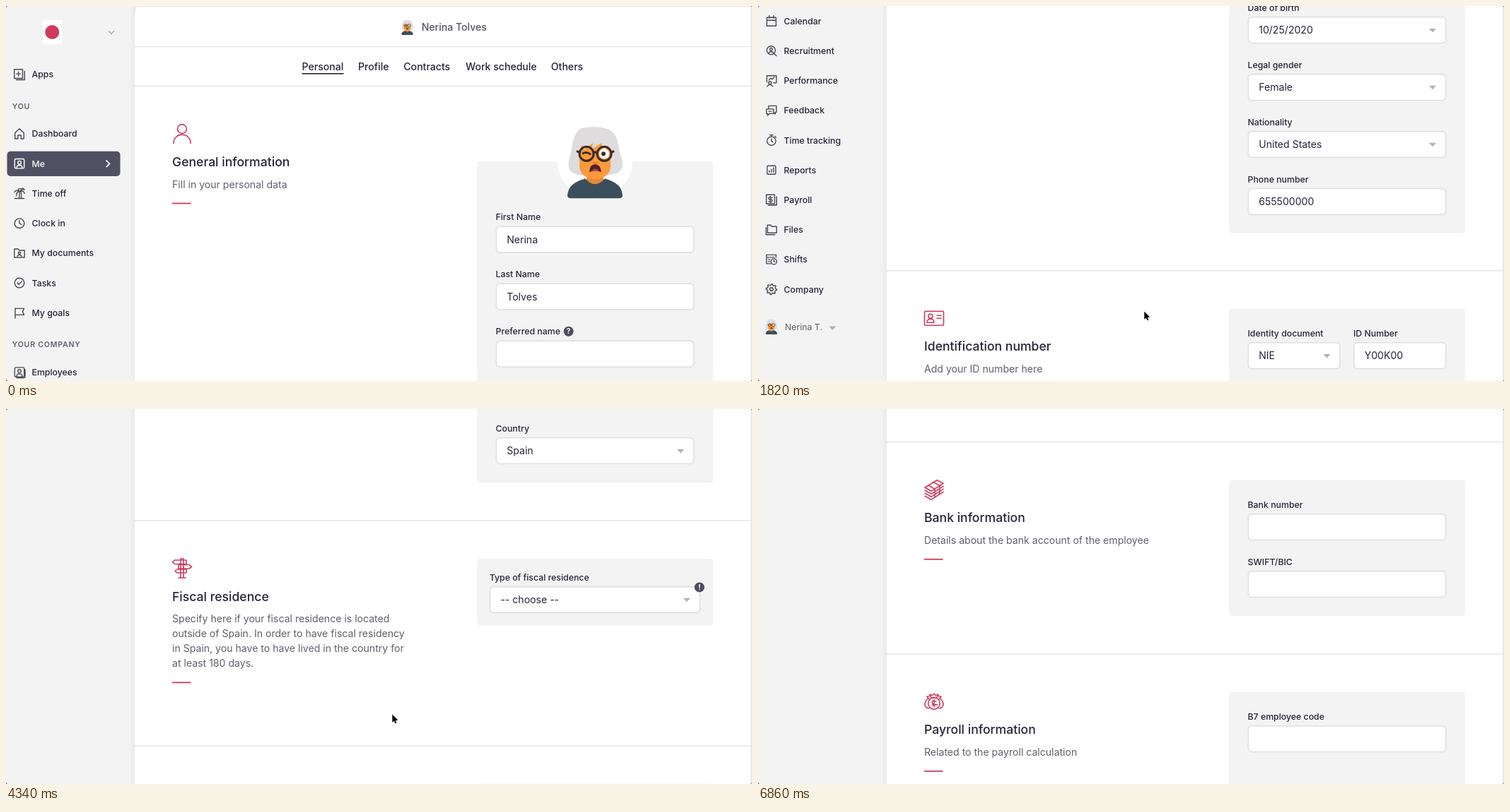
These frames come from a looping animation (1055x531 px, 7.28 s). An HTML page:

```html
<!DOCTYPE html>
<html lang="en">
<head>
<meta charset="utf-8">
<title>Employee profile</title>
<style>
  html, body { margin: 0; width: 100%; height: 100%; overflow: hidden; background: #555; }
  #stage { display: block; width: 1055px; height: 531px; border-radius: 3px; background: #f3f3f3; }
  text { font-family: Inter, sans-serif; fill: #25253a; }
  .icon { fill: none; stroke: #484852; stroke-width: 1.4; stroke-linejoin: round; stroke-linecap: round; }
  .red { stroke: #cf3a5b; stroke-width: 1.6; }
  .input { fill: #fff; stroke: #dfdfe1; stroke-width: 1.6; }
</style>
</head>
<body>
<svg id="stage" viewBox="0 0 1055 531">
  <defs>
    <linearGradient id="edge"><stop stop-color="#f1f1f1"/><stop offset="1" stop-color="#e9e9e9"/></linearGradient>
    <g id="avatar">
      <path fill="#dedcdc" d="M-20-49C-8-52 10-52 20-47C30-42 32-32 34-20C36-8 41-4 38 7C35 17 18 18 0 18S-34 18-37 7C-39-3-35-8-33-20C-31-34-28-44-20-49Z"/>
      <path fill="#e88a34" d="M-12 10H12V29L0 35L-12 29Z"/>
      <path fill="#fb9a3c" d="M-22-22Q0-38 22-22V4C22 17 10 23 0 23S-22 17-22 4Z"/>
      <path fill="#dedcdc" d="M-24-10V-30Q0-42 24-30V-10L19-24 12-18 9-28-4-20-3-28-16-19-18-27Z"/>
      <path fill="#3a4f5b" d="M-39 47C-38 31-28 27-14 22Q0 38 14 22C28 27 38 31 39 47Q38 50 34 50H-34Q-38 50-39 47Z"/>
      <circle cx="13" cy="-13" r="7" fill="#fff"/>
      <circle cx="12" cy="-13" r="3" fill="#3a2a25"/>
      <g fill="none" stroke="#382b28" stroke-width="3">
        <circle cx="-12" cy="-13" r="10"/><circle cx="13" cy="-13" r="10"/>
        <path d="M-2-14Q0-17 3-14M-22-15l-4-2M23-15l4-2M-18-13q6-4 12 1"/>
      </g>
      <path fill="none" stroke="#d5742a" stroke-width="2" d="M-3-1Q1 2 4-1"/>
      <path fill="#54202a" d="M-8 13Q-8 2 0 2T9 13Q0 9-8 13Z"/>
      <path fill="#e4606c" d="M-5 11Q0 6 6 11Q0 9-5 11Z"/>
    </g>
  </defs>
  <rect x="176" width="6.5" height="531" fill="url(#edge)"/>
  <rect x="1053" width="2" height="531" fill="#e8e8e8"/>
  <g id="page"></g>
  <path id="cursor" d="M546.3 432.6V443.8L548.8 441.5 550.5 445.3 552.4 444.5 550.8 440.8H554.4Z"
    stroke="#fff" stroke-width="1.4" paint-order="stroke"/>
</svg>
<script>
const INK = '#25253a', GREY = '#60606c', RED = '#cf3a5b', DARK = '#4c4c5e';

const text = (x, mid, label, size = 12.32, weight = 500, fill = INK, extra = '') =>
  `<text x="${x}" y="${mid + size * 0.36}" font-size="${size}" font-weight="${weight}" style="fill:${fill}" ${extra}>${label}</text>`;
const rect = (x, y, w, h, r, attrs) =>
  `<rect x="${x}" y="${y}" width="${w}" height="${h}" rx="${r}" ${attrs}/>`;
const path = (x, y, d, cls = 'icon', attrs = '') =>
  `<path transform="translate(${x} ${y})" class="${cls}" d="${d}" ${attrs}/>`;
const rule = (y) => rect(182, y - 0.75, 871, 1.5, 0, 'fill="#e6e6e7"');
const caret = (x, y) => path(x, y, 'M-5-2.5H5L0 3Z', '', 'fill="#b1b1b4"');
const face = (x, y, scale) => `<use href="#avatar" transform="translate(${x} ${y}) scale(${scale})"/>`;
const ring = (x, y, r) => `M${x - r} ${y}a${r} ${r} 0 1 0 ${2 * r} 0a${r} ${r} 0 1 0 ${-2 * r} 0`;
const badge = (x, y, mark) => `<circle cx="${x}" cy="${y}" r="7" fill="${DARK}"/>` +
  text(x, y, mark, 10, 700, '#fff', 'text-anchor="middle"');

// Label, box and value; y is the middle of the label.
function field(y, label, value = '', { x = 692.5, w = 281, menu = false, hint = false } = {}) {
  return text(x, y, label) + rect(x + 0.8, y + 13.3, w - 1.6, 36.8, 5, 'class="input"') +
    text(x + 15.7, y + 31.6, value, 14.08, 400, hint ? '#b6b6bb' : INK) +
    (menu ? caret(x + w - 19.5, y + 32) : '');
}
const ROW = 80.96;
const fields = (y, list) => list.map((args, i) => field(y + i * ROW, ...args)).join('');
const MENU = { menu: true };
const LEFT = { w: 131.5 }, RIGHT = { x: 842, w: 131.5 };

const PERSON = ring(0, -1.5, 2.3) + 'M-4 6C-4 1 4 1 4 6';
const FRAME = 'M-5-6.7H5Q6.7-6.7 6.7-5V5Q6.7 6.7 5 6.7H-5Q-6.7 6.7-6.7 5V-5Q-6.7-6.7-5-6.7Z';
const CLOCK = ring(0, 0, 6.8) + 'M0-4V0L3 2';
const STACK = 'M-7.3-7.3H4.5V5.5H-7.3ZM7.3-4.5V7.5H-4.5';
const menuItems = [
  [97, 'Apps', STACK + 'M-1.4-3.8V2M-4.3-.9H1.5'],
  [181, 'Dashboard', 'M-6.2 7V-1.5L0-7.2 6.2-1.5V7H2.2V2H-2.2V7Z'],
  [223.2, 'Me', FRAME + PERSON],
  [265.5, 'Time off', 'M-6.5 7H6.5M-1 7Q1 3 0-3M2.5 7Q3.5 2 2-3M-7-2Q-5-6 0-3Q-4-8 2-6.5Q5-8.5 7-5.5Q3-6 1-3.5Q7-4 7 0M-4 3Q-5-2 0-3'],
  [307.7, 'Clock in', CLOCK],
  [350, 'My documents', 'M-7.2 6V-6H-2L0-4H7.2V6Z' + ring(0, -.2, 1.6) + 'M-3 4Q0 1 3 4'],
  [392.1, 'Tasks', ring(0, 0, 6.8) + 'M-3 0L-.8 2.3 3.2-2.3'],
  [434.4, 'My goals', 'M-6 7.5V-6.5M-6-6H6.5L4.5-1.5 6.5 3H-6'],
  [518.6, 'Employees', FRAME + PERSON + 'M8-4V6Q8 8 6 8H-4'],
  [560.8, 'Calendar', 'M-6.5-5H6.5V7H-6.5ZM-6.5-1H6.5M-3-7.5V-4M3-7.5V-4'],
  [603, 'Recruitment', ring(-.5, -.7, 6) + ring(-.5, -2.3, 1.8) + 'M-4 3Q-.5-1 3 3M4 4L7 7'],
  [645.2, 'Performance', 'M-6.5 2V-7H7V3H3M-3.5-1L-1-3.5 1-2 4-5' + ring(-2, 3, 2) + 'M-6 8Q-2 3 2 8'],
  [687.4, 'Feedback', 'M-4-2V-6.5H7V2.5H5.5V5L3 2.5M-7-2H3V4.5H-3L-5.5 7V4.5H-7ZM-4 1.2H0'],
  [729.6, 'Time tracking', ring(0, 1, 6.2) + 'M-2.5-7.5H2.5M0-7.5V-5M0-2V1L2 2.5M5-5.5L6.5-4'],
  [771.8, 'Reports', FRAME.replaceAll('6.7', '6') + 'M-3 3V1M0 3V-1M3 3V-3'],
  [814, 'Payroll', STACK + 'M1-3Q-4-5-4-2.5T-1.5-.7 1 1.3T-4 2.3M-1.5-5V4'],
  [856.2, 'Files', 'M-5.5-6.5H-1L.5-4.5H7.3V4.5H-5.5ZM-7.5-3V7H5'],
  [898.4, 'Shifts', 'M-1 6H-7V-6.5H6.5V-3M-7-3H4M-4.5 0H-2M-4.5 3H-2' + ring(3.5, 3, 4) + 'M3.5 1V3.2H5'],
  [940.6, 'Company', Array.from({ length: 33 }, (_, i) => {
    const r = i % 4 < 2 ? 7.5 : 5.6, a = i * Math.PI / 16;
    return `${i ? 'L' : 'M'}${(r * Math.cos(a)).toFixed(1)} ${(r * Math.sin(a)).toFixed(1)}`;
  }).join('') + ring(0, 0, 2.4)],
];

function sidebar() {
  const heading = (y, label) => text(8.8, y, label, 10.56, 600, GREY, 'letter-spacing=".8"');
  return rect(52, 20, 27, 34, 0, 'fill="#fff"') + `<circle cx="65.3" cy="37" r="10" fill="${RED}"/>` +
    path(149, 37.5, 'M-3.5-1.7L0 1.7 3.5-1.7', 'icon', 'style="stroke:#aaa"') +
    heading(142, 'YOU') + heading(479.6, 'YOUR COMPANY') +
    rect(1.5, 205.8, 160, 35.2, 5, `fill="#505063"`) +
    menuItems.map(([y, label, d]) => {
      const active = label === 'Me';
      return path(19, y, d, 'icon', active ? 'style="stroke:#fff"' : '') +
        text(36.5, y, label, 12.32, 500, active ? '#fff' : INK);
    }).join('') +
    path(144.3, 223.3, 'M-2.2-4.3L2.2 0-2.2 4.3', 'icon', 'style="stroke:#fff;stroke-width:1.8"') +
    face(19, 994, 0.21) + text(38, 993.7, 'Nerina T.', 12.32, 400, GREY) + caret(105.3, 995.5);
}

const sign = 'M-2-13.5H2V13.5H-2ZM-5 13.5H5M-10.5-11.5H6V-6H-10.5L-13.5-8.7ZM-5-5H10L13.5-2.2 10 .5H-5ZM-7 1.5H6V6.5H-7L-10 4Z';
const redIcons = {
  person: ring(0, -7, 6.4) + 'M-12 13.5C-12-3 12-3 12 13.5',
  card: 'M-12-10H12Q13.5-10 13.5-8.5V8.5Q13.5 10 12 10H-12Q-13.5 10-13.5 8.5V-8.5Q-13.5-10-12-10Z' +
    ring(-5, -3, 3) + 'M-10 6Q-10 1-5 1T0 6ZM4-4H10M4 0H10',
  sign,
  phone: 'M-11-9L-6-13-1-6-4-2Q-1 3 4 5L8 2 13 7 9 12C-2 13-12 1-11-9Z',
  notes: 'M-13-3L4-13.5 13-9-4 2ZM-8-6L1-1V11M-1-10.5L8-6V6' +
    [0, 1, 2, 3].map(i => `M-13 ${i * 4 - 3}L-4 ${i * 4 + 2} 13 ${i * 4 - 9}`).join(''),
  bag: ring(0, 2.5, 8.3) + 'M-3.5-5L-6-10-2-9 0-11 2-9 6-10 3.5-5ZM-7.5-4L-10-7-6-8M-9-4C-15 2-14 9-7 9.5M7.5-4L10-7 6-8M9-4C15 2 14 9 7 9.5' +
    'M2.7 0Q-2.7-2.5-2.7 .8T2.7 4.2-2.7 5M0-2.5V7.5',
};

function section(top, icon, title, lines, panelTop, panelBottom, content) {
  const dash = top + 166 + (lines.length - 1) * 21.1;
  return rule(top) + path(249, top + 67.5, redIcons[icon], 'icon red') +
    text(235, top + 107.2, title, 17.6) +
    lines.map((line, i) => text(235, top + 139 + i * 21.1, line, 14.08, 400, GREY)).join('') +
    rect(235, dash - 0.9, 26.5, 1.8, 0, `fill="${RED}"`) +
    rect(666.3, panelTop, 333.5, panelBottom - panelTop, 4, 'fill="#f3f3f3"') + content;
}

function mainPage() {
  const tabs = [[418.5, 'Personal'], [498, 'Profile'], [562.3, 'Contracts'], [650, 'Work schedule'], [770.8, 'Others']];
  return '<path d="M182 3000V6Q182 1 187 1H1053V3000Z" fill="#fff"/>' +
    '<path d="M182.5 8V6Q182.5 .5 187 .5H1053" fill="none" stroke="#e4e4e4"/>' +
    face(567.5, 30.5, 0.21) + text(587.7, 30, 'Nerina Tolves', 14.08, 500, '#555560') + rule(57.5) +
    tabs.map(([x, label]) => text(x, 86.3, label, 14.08)).join('') +
    rect(418.5, 95, 59, 1.6, 0, `fill="${INK}"`) +
    section(113.5, 'person', 'General information', ['Fill in your personal data'], 220, 861,
      '<circle cx="833" cy="219" r="53.3" fill="#fff"/>' + face(833, 222.3, 1) +
      fields(299, [['First Name', 'Nerina'], ['Last Name', 'Tolves'], ['Preferred name'],
        ['Date of birth', '10/25/2020', MENU], ['Legal gender', 'Female', MENU],
        ['Nationality', 'United States', MENU], ['Phone number', '655500000']]) +
      badge(795.6, 460.8, '?')) +
    section(914.3, 'card', 'Identification number', ['Add your ID number here'], 968, 1200,
      field(1003, 'Identity document', 'NIE', { ...LEFT, ...MENU }) +
      field(1003, 'ID Number', 'Y00K00', RIGHT) +
      field(1084, 'Social Security Number', '00012300045') +
      rect(693, 1156.6, 10.6, 10.6, 2, 'fill="#fff" stroke="#777780" stroke-width="1.1"') +
      text(712.7, 1162.4, 'The employee has work permit', 14.08, 500, '#575762')) +
    section(1253, 'sign', 'Address', ['Fill in your address'], 1307, 1742.5,
      fields(1341.6, [['Address line 1', 'Carrer Nival 10'], ['Address line 2', 'optional', { hint: true }],
        ['City', 'Barcelona', LEFT], ['State/Province', 'Barcelona', MENU], ['Country', 'Spain', MENU]]) +
      field(1341.6 + 2 * ROW, 'Postal code', '08000', RIGHT)) +
    section(1796, 'sign', 'Fiscal residence', [
      'Specify here if your fiscal residence is located', 'outside of Spain. In order to have fiscal residency',
      'in Spain, you have to have lived in the country for', 'at least 180 days.'], 1850, 1944.5,
      field(1876.3, 'Type of fiscal residence', '-- choose --', { x: 683.7, w: 298.6, menu: true }) +
      badge(1638 - 657.3, 1890.4, '!')) +
    section(2115, 'phone', 'Emergency contact', ['Contact in case of an emergency'], 2168.5, 2361,
      fields(2203.5, [['Contact name'], ['Phone Number']])) +
    section(2414.8, 'notes', 'Bank information', ['Details about the bank account of the employee'], 2468.5, 2661,
      fields(2503.4, [['Bank number'], ['SWIFT/BIC']])) +
    section(2714.8, 'bag', 'Payroll information', ['Related to the payroll calculation'], 2768.5, 2980,
      field(2803.4, 'B7 employee code'));
}

const page = document.getElementById('page');
const cursor = document.getElementById('cursor');
page.innerHTML = sidebar() + mainPage();

const LOOP = 7280, STEP = 70;
const linear = p => p;
const smooth = p => (1 - Math.cos(Math.PI * p)) / 2;
const easeIn = p => p ** 1.4;
const easeOut = p => 1 - (1 - p) ** 2;
// Time in ms, scroll offset, easing towards that offset.
const scrolls = [
  [0, 0], [490, 0], [1260, 286.5, easeIn], [1680, 515, easeOut],
  [1750, 515], [1820, 539.5], [2590, 905, easeOut],
  [2800, 905], [2870, 923], [3360, 1175, easeOut],
  [3430, 1175], [3920, 1430, smooth], [3990, 1430], [4340, 1638, smooth],
  [4550, 1638], [5110, 1960, smooth], [5180, 1960], [5670, 2276, smooth],
  [5950, 2357, easeOut], [6790, 2368, easeOut], [LOOP, 2368],
];

function scrollAt(time) {
  const i = scrolls.findIndex(([end]) => time < end);
  const [t0, from] = scrolls[i - 1], [t1, to, ease = linear] = scrolls[i];
  return from + (to - from) * ease((time - t0) / (t1 - t0));
}

const start = performance.now();
function draw() {
  const time = Math.floor((performance.now() - start) % LOOP / STEP) * STEP;
  page.setAttribute('transform', `translate(0 ${-scrollAt(time)})`);
  cursor.style.visibility = time >= 70 && time < 6790 ? 'visible' : 'hidden';
  requestAnimationFrame(draw);
}
draw();
</script>
</body>
</html>
```
